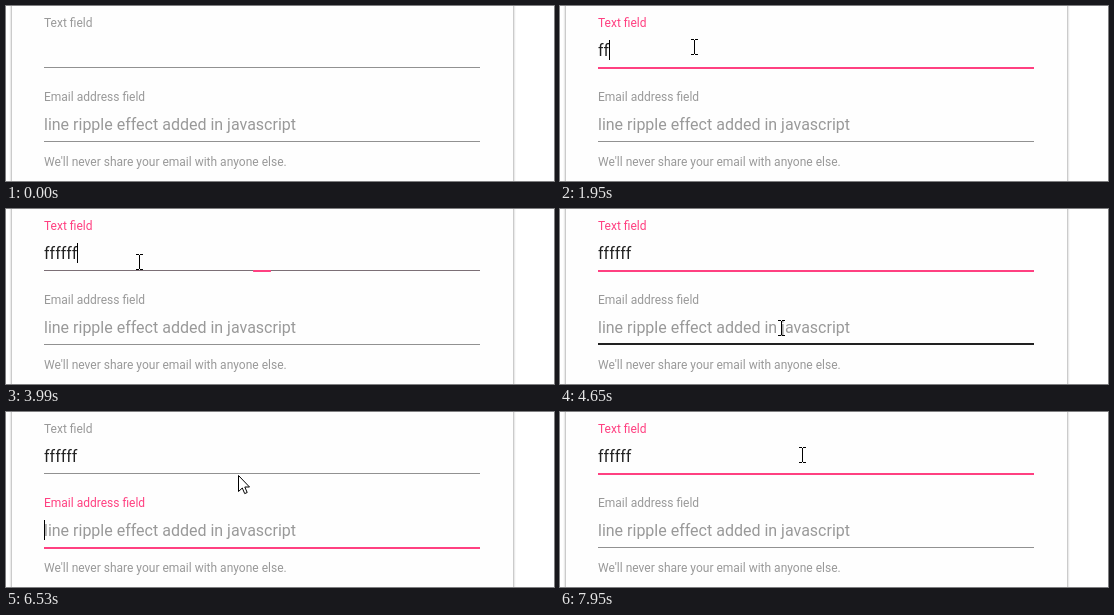
Animation of 548x175 px, one loop 8 s. Source, as an HTML page:

```html
<!DOCTYPE html>
<html lang="en">
<head>
<meta charset="utf-8">
<title>Line ripple text fields</title>
<style>
  html, body { margin: 0; width: 100%; height: 100%; overflow: hidden; background: #fff; }
  svg { display: block; width: 100%; height: 100%; overflow: hidden; }
  text { font: 12px Roboto, sans-serif; fill: #999; white-space: pre; }
  .card { fill: #fefefe; filter: drop-shadow(0 0 1.5px rgba(0, 0, 0, .55)); }
  .input { font-size: 16px; }
  #typed { fill: #212121; }
  .ripple { fill: #ff4081; }
  .line { fill: #919191; }
  .hovered .line { fill: #212121; }
  .focused .line { fill: #7c6f76; }
  .focused .label { fill: #ff4081; }
  #tip text { font: 12px "Open Sans", sans-serif; fill: #575757; }
</style>
</head>
<body>
<svg viewBox="0 0 548 175">
  <rect class="card" x="6" y="-20" width="501" height="215"/>
  <g id="name">
    <text class="label" x="38" y="21">Text field</text>
    <text class="input" id="typed" x="38" y="50"></text>
    <rect class="line" x="38" width="436"/>
    <rect class="ripple" y="61" height="2"/>
  </g>
  <g id="email">
    <text class="label" x="38" y="95">Email address field</text>
    <text class="input" x="38" y="124">line ripple effect added in javascript</text>
    <rect class="line" x="38" width="436"/>
    <rect class="ripple" y="135" height="2"/>
  </g>
  <text x="38" y="160">We'll never share your email with anyone else.</text>
  <rect id="caret" width="1" height="20"/>
  <g id="tip">
    <rect x="220.5" y="143.5" width="167" height="22" fill="#fff" stroke="#767676"/>
    <text x="229" y="159">Please fill out this field.</text>
  </g>
  <path id="arrow" d="M.5 .5V16.5L4.3 13L6.7 18.6L9.2 17.5L6.8 12H11.5Z" fill="#fff" stroke="#000"/>
  <path id="beam" d="M-3 -7.5H0M1 -7.5H4M-3 7.5H0M1 7.5H4M.5 -7V7" fill="none" stroke="#000"/>
</svg>
<script>
const LOOP = 8000, STEP = 73, FADE = 180, BLINK = 520, TIP_DELAY = 530;
const LEFT = 38, WIDTH = 436, LETTER = 5.55;

const $ = id => document.getElementById(id);
const clamp = v => Math.min(1, Math.max(0, v));
const show = (el, on) => el.setAttribute('visibility', on ? 'visible' : 'hidden');
const set = (el, attrs) => { for (const k in attrs) el.setAttribute(k, attrs[k]); };

const makeField = (id, bottom) => ({
  el: $(id), bottom,
  line: $(id).querySelector('.line'),
  ripple: $(id).querySelector('.ripple')
});
const name = makeField('name', 62), email = makeField('email', 136);

// `lead` is how far the ripple has run when the click becomes visible.
const clicks = [
  { at: 810, lead: 53, field: name },
  { at: 3090, lead: 53, field: null },
  { at: 3990, lead: 22, field: name },
  { at: 5400, lead: 22, field: email },
  { at: 7360, lead: 53, field: name }
];
const keys = [1820, 1950, 2180, 2320, 2330, 2340];
const home = { x: 188, y: 168 };
const moves = [
  { from: -13, to: 500, x: 134, y: 41 },
  { from: 2420, to: 2860, x: 23, y: 54 },
  { from: 3387, to: 3760, x: 133, y: 53 },
  { from: 4210, to: 4650, x: 221, y: 119 },
  { from: 6237, to: 6530, x: 232, y: 63 },
  { from: 6530, to: 6970, x: 242, y: 43 }
];

// cubic-bezier(.4, 0, .2, 1)
function ease(x) {
  let lo = 0, hi = 1;
  for (let i = 0; i < 24; i++) {
    const s = (lo + hi) / 2, r = 1 - s;
    if (1.2 * s * r * r + .6 * s * s * r + s ** 3 < x) lo = s; else hi = s;
  }
  return 3 * lo * lo - 2 * lo ** 3;
}

// Motion advances in coarse steps, like a slow screen recording.
function progress(t, { from, to }) {
  const steps = Math.round((to - from) / STEP);
  return clamp(Math.floor((t - from) / (to - from) * steps + .01) / steps);
}

function pointerAt(t) {
  let { x, y } = home;
  for (const m of moves) {
    const k = progress(t, m);
    x += (m.x - x) * k;
    y += (m.y - y) * k;
  }
  return [Math.round(x), Math.round(y)];
}

function drawField(f, t, click, previous, hovered) {
  const focused = click?.field === f;
  const leaving = !focused && previous?.field === f;
  const age = click ? click.lead + STEP * Math.floor((t - click.at) / STEP) : 0;
  const k = ease(clamp(age / FADE));
  const width = focused ? WIDTH * k : leaving ? WIDTH : 0;
  const height = hovered && !focused ? 2 : 1;
  f.el.classList.toggle('focused', focused);
  f.el.classList.toggle('hovered', hovered);
  set(f.line, { y: f.bottom - height, height });
  set(f.ripple, { x: LEFT + (WIDTH - width) / 2, width, opacity: leaving ? 1 - k : 1 });
}

function draw(t) {
  const past = clicks.filter(c => t >= c.at);
  const [previous, click] = [past.at(-2), past.at(-1)];
  const active = click?.field;
  const typed = keys.filter(k => t >= k);
  const [x, y] = pointerAt(t);
  const visible = t >= 60;
  const over = f => visible && x >= LEFT && x < LEFT + WIDTH && y >= f.bottom - 29 && y < f.bottom;

  for (const f of [name, email]) drawField(f, t, click, previous, over(f));
  $('typed').textContent = 'f'.repeat(typed.length);

  if (active) {
    const touched = Math.max(click.at - click.lead, typed.at(-1) ?? 0);
    const letters = active === name ? typed.length : 0;
    set($('caret'), { x: Math.floor(LEFT + LETTER * letters), y: active.bottom - 28 });
    show($('caret'), Math.floor((t - touched) / BLINK) % 2 === 0);
  } else show($('caret'), false);

  const rested = t - moves.filter(m => t >= m.from).at(-1).to;
  show($('tip'), over(email) && active !== email && rested > TIP_DELAY + STEP);

  const inField = over(name) || over(email);
  show($('beam'), inField);
  show($('arrow'), visible && !inField);
  for (const id of ['beam', 'arrow']) set($(id), { transform: `translate(${x} ${y})` });
}

const start = performance.now();
function tick() {
  draw((performance.now() - start) % LOOP);
  requestAnimationFrame(tick);
}
tick();
</script>
</body>
</html>
```
